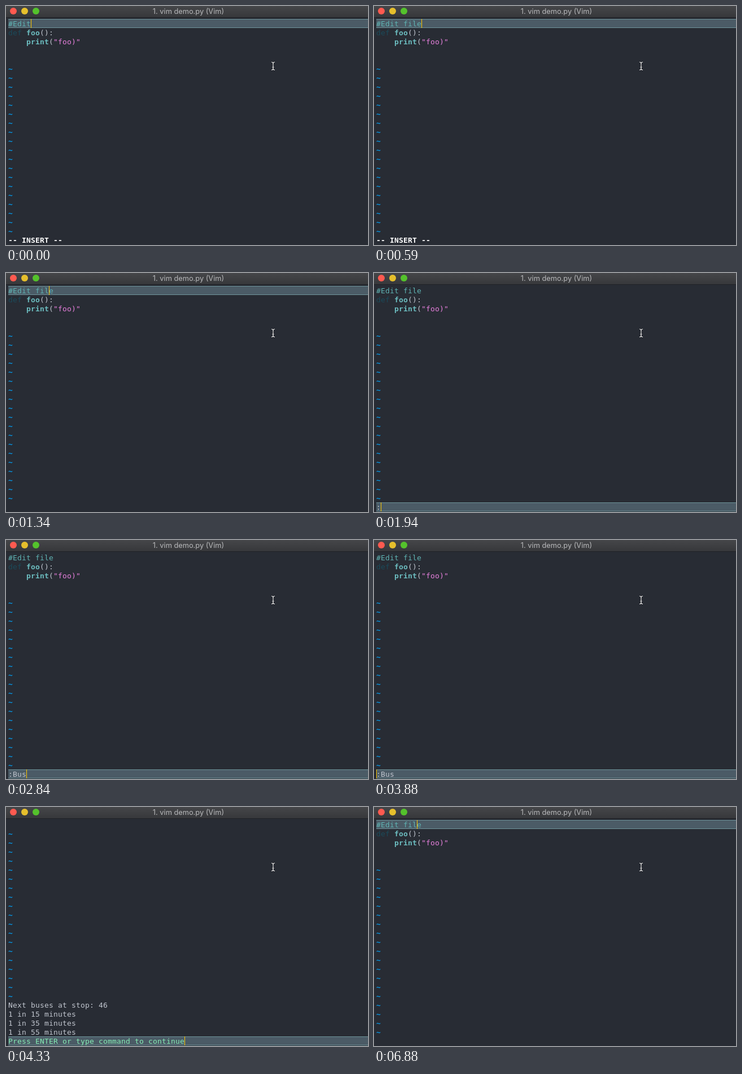
Write an HTML page with a canvas that moves like this. It is 641x424 px and loops after 8 s.

```html
<!DOCTYPE html>
<html lang="en">
<head>
<meta charset="utf-8">
<title>Terminal</title>
<style>
html, body { margin: 0; width: 100%; height: 100%; overflow: hidden; background: #282c34; }
canvas { display: block; width: 641px; height: 424px; }
</style>
</head>
<body>
<canvas id="stage" width="641" height="424"></canvas>
<script>
const ctx = document.getElementById('stage').getContext('2d');
const W = 641, H = 424, LOOP = 8000;
const CELL = 8, ROW = 16, LEFT = 4, TOP = 23, LAST = 24;
const C = {
  bg: '#282c34', text: '#c0c5ce', comment: '#5fb3b3', keyword: '#1b4b5b',
  name: '#6cbdc0', string: '#e880de', tilde: '#0599e8', white: '#ffffff',
  prompt: '#86edb5', line: '#4b5b66', edge: '#6f949b', cursor: '#ffc600'
};

// Each step: start time, mode, typed text, cursor column
const steps = [
  [0, 'insert', '#Edit', 5],
  [140, 'insert', '#Edit ', 6],
  [290, 'insert', '#Edit fi', 8],
  [590, 'insert', '#Edit file', 10],
  [1340, 'normal', '#Edit file', 9],
  [1940, 'command', ':', 1],
  [2540, 'command', ':B', 2],
  [2690, 'command', ':Bu', 3],
  [2840, 'command', ':Bus', 4],
  [3880, 'command', ':Bus', 0],
  [4330, 'output', 'Press ENTER or type command to continue', 39],
  [6880, 'normal', '#Edit file', 9]
];
const buses = ['Next buses at stop: 46', '1 in 15 minutes', '1 in 35 minutes', '1 in 55 minutes'];

// Terminal text: one glyph per grid cell
function put(text, col, row, color, bold) {
  ctx.font = (bold ? 'bold ' : '') + '13px "DejaVu Sans Mono", monospace';
  ctx.textAlign = 'left';
  ctx.fillStyle = color;
  [...text].forEach((ch, i) =>
    ctx.fillText(ch, LEFT + (col + i) * CELL, TOP + row * ROW + 13));
}

function rect(x, y, w, h, color) {
  ctx.fillStyle = color;
  ctx.fillRect(x, y, w, h);
}

function titleBar() {
  const g = ctx.createLinearGradient(0, 0, 0, 20);
  g.addColorStop(0, '#454649');
  g.addColorStop(1, '#37383b');
  rect(0, 0, W, 20, g);
  rect(0, 20, W, 1, '#1f2126');
  ['#ff5a50', '#e6bf2c', '#54c22c'].forEach((color, i) => {
    ctx.fillStyle = color;
    ctx.beginPath();
    ctx.arc(13 + 20 * i, 9, 6, 0, Math.PI * 2);
    ctx.fill();
  });
  ctx.font = '12.8px Inter, sans-serif';
  ctx.textAlign = 'center';
  ctx.fillStyle = '#b9babc';
  ctx.fillText('1. vim demo.py (Vim)', 323, 14);
}

function currentLine(row) {
  const y = TOP + row * ROW;
  rect(LEFT, y, W - LEFT, ROW, C.line);
  rect(LEFT, y, W - LEFT, 1, C.edge);
  rect(LEFT, y + ROW - 1, W - LEFT, 1, C.edge);
}

function tildes(from, to) {
  for (let r = from; r <= to; r++) put('~', 0, r, C.tilde, true);
}

function code(heading) {
  put(heading, 0, 0, C.comment);
  put('def', 0, 1, C.keyword);
  put('foo', 4, 1, C.name, true);
  put('():', 7, 1, C.text);
  put('print', 4, 2, C.name, true);
  put('(', 9, 2, C.text);
  put('"foo)"', 10, 2, C.string);
  tildes(5, 23);
}

function pointer() {
  const p = new Path2D(
    'M470 99.5Q473 99.5 473 102Q473 99.5 476 99.5' +
    'M473 102V111M471.5 108.5H474.5' +
    'M470 113.5Q473 113.5 473 111Q473 113.5 476 113.5');
  ctx.strokeStyle = '#15181d';
  ctx.lineWidth = 2.6;
  ctx.stroke(p);
  ctx.strokeStyle = '#f2f2f2';
  ctx.lineWidth = 1.2;
  ctx.stroke(p);
}

function draw(t) {
  const [, mode, typed, col] = steps.findLast(s => s[0] <= t);
  const editing = mode === 'insert' || mode === 'normal';
  const row = editing ? 0 : LAST;
  rect(0, 0, W, H, C.bg);
  titleBar();
  currentLine(row);
  if (mode === 'output') {
    tildes(1, 19);
    buses.forEach((s, i) => put(s, 0, 20 + i, C.text));
    put(typed, 0, LAST, C.prompt);
  } else {
    code(editing ? typed : '#Edit file');
    if (mode === 'insert') put('-- INSERT --', 0, LAST, C.white, true);
    if (mode === 'command') put(typed, 0, LAST, C.text);
  }
  rect(LEFT + col * CELL, TOP + row * ROW, 1, ROW, C.cursor);
  pointer();
}

const start = performance.now();
function tick() {
  draw((performance.now() - start) % LOOP);
  requestAnimationFrame(tick);
}
tick();
</script>
</body>
</html>
```
